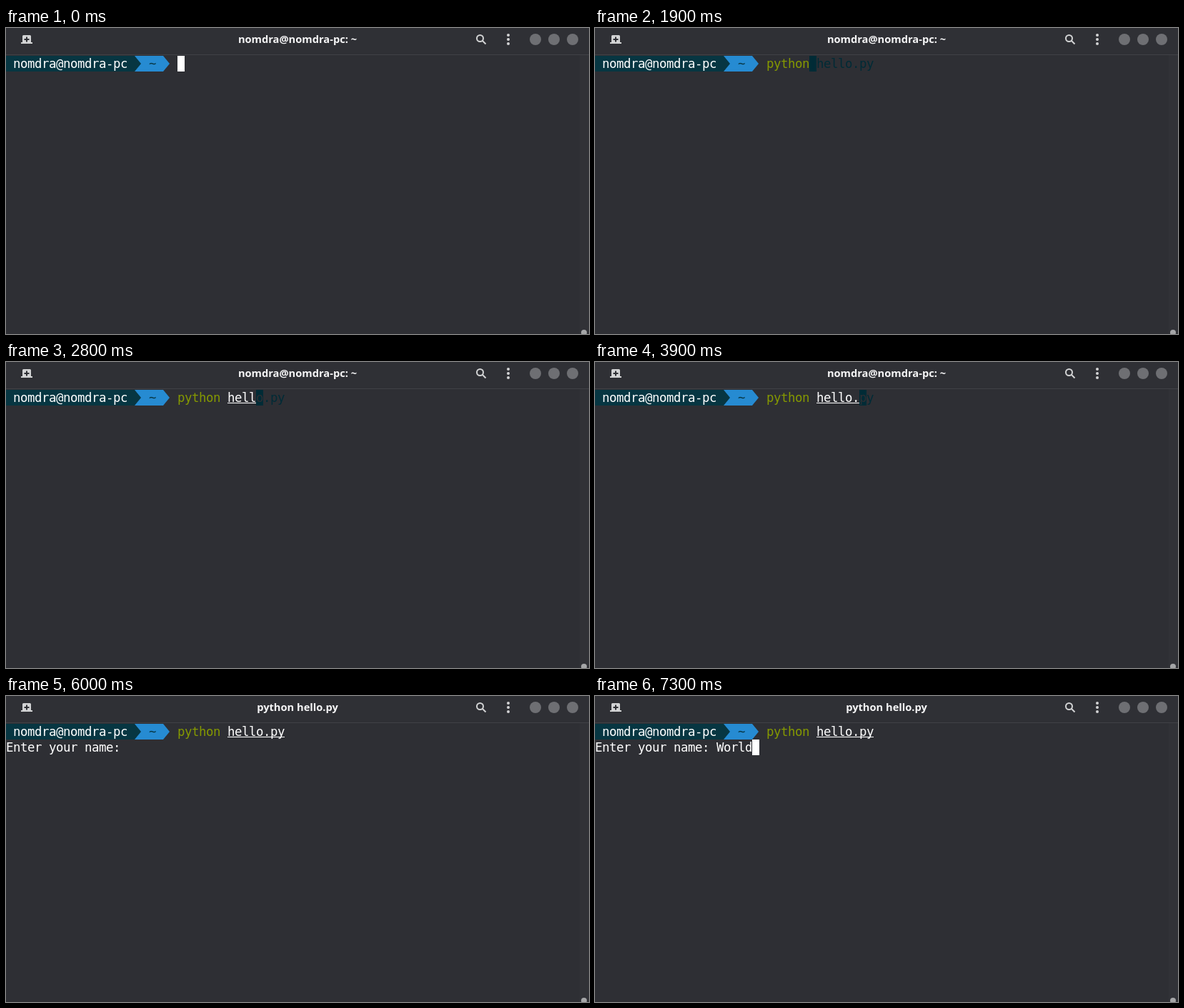
An HTML page that plays this animation: 816 by 429 pixels, repeating every 8000 ms.

```html
<!DOCTYPE html>
<html lang="en">
<head>
<meta charset="utf-8">
<title>Terminal</title>
<style>
  html, body { margin: 0; width: 100%; height: 100%; overflow: hidden; background: #2e2f34; }
  svg { display: block; width: 816px; height: 429px; }
  text { white-space: pre; }
  .mono { font: 17.333px "DejaVu Sans Mono", "Noto Sans Mono", monospace; letter-spacing: -.435px; }
  .title { font: bold 14.667px "Noto Sans", "Open Sans", sans-serif; text-anchor: middle; fill: #f5f5f6; }
</style>
</head>
<body>
<svg viewBox="0 0 816 429" xmlns="http://www.w3.org/2000/svg">
  <rect width="816" height="429" fill="#2e2f34"/>
  <rect width="816" height="37" fill="#2f3035"/>
  <rect y="37" width="816" height="1" fill="#404146"/>
  <rect x="803" y="38" width="13" height="391" fill="#313237"/>
  <circle cx="809" cy="427" r="4" fill="#a5a6a8"/>

  <g fill="#d2d3d4">
    <path d="M23 20V11.5Q23 10 24.500 10H33.500Q35 10 35 11.500V20H37V22H21V20Z"/>
    <path d="M28 12.500h2v2.500h2.500v2h-2.500v2.500h-2v-2.500h-2.500v-2h2.500z" fill="#2f3035"/>
    <circle cx="703" cy="10" r="2"/>
    <circle cx="703" cy="16" r="2"/>
    <circle cx="703" cy="22" r="2"/>
  </g>
  <g fill="none" stroke="#d2d3d4" stroke-width="2">
    <circle cx="663.5" cy="14.5" r="4.5"/>
    <path d="M666.500 17.500L671.500 22.500"/>
  </g>
  <g fill="#6e6f73">
    <circle cx="741" cy="16" r="8"/>
    <circle cx="767" cy="16" r="8"/>
    <circle cx="793" cy="16" r="8"/>
  </g>
  <text id="title" class="title" x="408" y="21"></text>

  <rect y="39" width="180" height="22" fill="#073642"/>
  <path d="M180 39H220L229 50L220 61H180Z" fill="#268bd2"/>
  <path d="M180 39L189 50L180 61Z" fill="#073642"/>
  <g class="mono">
    <text x="10" y="56" fill="#fff">nomdra@nomdra-pc</text>
    <text x="200" y="56" fill="#073642">~</text>
    <text id="hint" y="56" fill="#002b36"></text>
    <text id="command" x="240" y="56"></text>
    <text id="file" x="310" y="56" fill="#fff"></text>
    <rect id="underline" y="57" height="1" fill="#fff"/>
    <text id="answer" x="0" y="78" fill="#fff"></text>
    <rect id="cursor" width="10" height="22"/>
    <text id="under" y="56" fill="#2e2f34"></text>
  </g>
</svg>
<script>
const LOOP = 8000, CELL = 10, START = 240, ENTER = 5400;
const LINE = "python hello.py", QUESTION = "Enter your name: ", NAME = "World";

// [time, number of characters typed]
const lineKeys = [[0, 0], [600, 1], [800, 2], [1200, 4], [1500, 5], [1900, 6], [2000, 7],
  [2200, 8], [2400, 9], [2700, 10], [2800, 11], [3400, 12], [3900, 13], [4300, 14], [4400, 15]];
const nameKeys = [[0, 0], [6500, 1], [7000, 3], [7100, 4], [7300, 5]];
const blinks = [[5100, 5200], [6000, 6300]];

const part = Object.fromEntries([...document.querySelectorAll("[id]")].map(e => [e.id, e]));

function typed(keys, t) {
  let count = 0;
  for (const [time, n] of keys) if (t >= time) count = n;
  return count;
}

function set(el, attrs, text) {
  for (const key in attrs) el.setAttribute(key, attrs[key]);
  if (text !== undefined && el.textContent !== text) el.textContent = text;
}

function commandStyle(n) {
  if (n >= 6) return { fill: "#859900", "font-weight": "normal" };
  if (n >= 2) return { fill: "#dc322f", "font-weight": "bold" };
  return { fill: "#fff", "font-weight": "normal" };
}

function draw(t) {
  const running = t >= ENTER;
  const n = typed(lineKeys, t);
  const end = START + n * CELL;
  const hinting = n > 0 && n < LINE.length;
  const answer = running ? QUESTION + NAME.slice(0, typed(nameKeys, t)) : "";
  const file = LINE.slice(7, Math.max(n, 7));

  set(part.title, {}, running ? "python hello.py" : "nomdra@nomdra-pc: ~");
  set(part.command, commandStyle(n), LINE.slice(0, Math.min(n, 6)));
  set(part.file, {}, file);
  set(part.underline, n === 1 ? { x: START, width: CELL } : { x: 310, width: file.length * CELL });
  set(part.answer, {}, answer);

  // The character below the cursor is drawn inverted.
  set(part.hint, { x: end + CELL }, hinting ? LINE.slice(n + 1) : "");
  set(part.under, { x: end }, hinting ? LINE[n] : "");

  const hidden = blinks.some(([from, to]) => t >= from && t < to);
  set(part.cursor, {
    x: running ? answer.length * CELL : end,
    y: running ? 61 : 39,
    fill: hinting ? "#002b36" : "#fff",
    visibility: hidden ? "hidden" : "visible"
  });
}

const begin = performance.now();
function tick() {
  draw((performance.now() - begin) % LOOP);
  requestAnimationFrame(tick);
}
draw(0);
requestAnimationFrame(tick);
</script>
</body>
</html>
```
